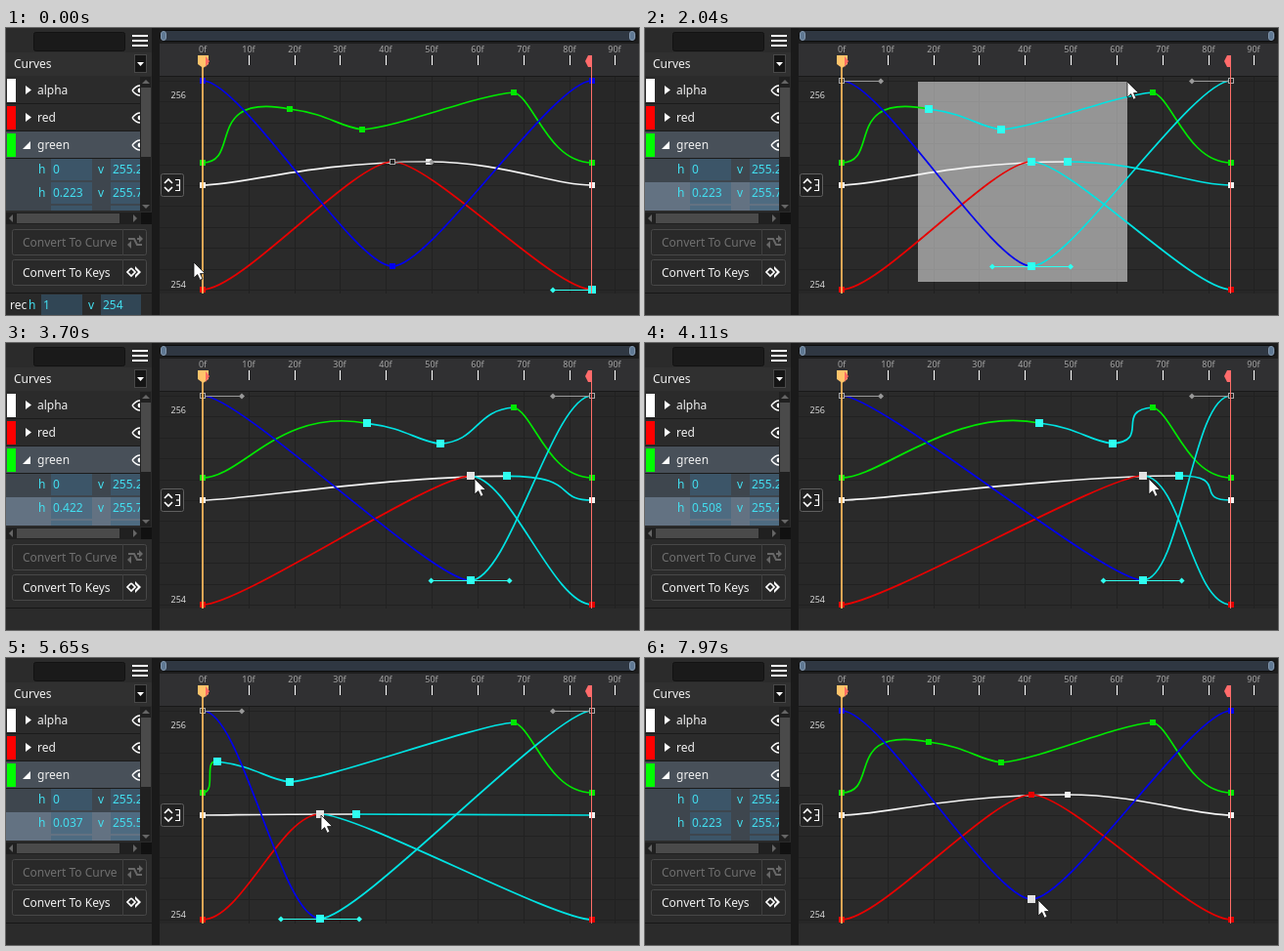
These frames come from a looping animation (647 by 294 pixels, 8 s). An HTML page with a canvas:

```html
<!DOCTYPE html>
<html lang="en">
<head>
<meta charset="utf-8">
<title>Curve editor</title>
<style>
html, body { margin: 0; width: 100%; height: 100%; overflow: hidden; background: #2b2b2b; }
canvas { display: block; }
</style>
</head>
<body>
<canvas id="stage" width="647" height="294"></canvas>
<script>
const ctx = document.getElementById('stage').getContext('2d');
const LOOP = 8000, FRAME = 398 / 85, CYAN = '#2ffff0';
const MARQUEE = { x: 279, y: 260, from: 890, to: 2220 };
const DESELECT_FIRST = 820, DESELECT_ALL = 7230;

// Time, x, y
const cursorPath = [
  [50, 192, 240], [840, 279, 260], [890, 279, 260], [1300, 379, 150],
  [1660, 459, 73], [2040, 493, 55], [2220, 493, 55], [2960, 397, 138],
  [3140, 397, 138], [3930, 513, 139], [4160, 515, 139], [4360, 515, 139],
  [4450, 512, 140], [4680, 512, 140], [5470, 326, 158], [5650, 322, 161],
  [5980, 322, 161], [6540, 397, 142], [6770, 397, 142], [6870, 417, 174],
  [7230, 480, 200], [7560, 480, 200], [7970, 402, 248]
];
const dragPath = [
  [3140, 0, 0], [3930, 112, -1], [4160, 114, -1], [4360, 114, -1],
  [4450, 111, 0], [4680, 111, 0], [5470, -70, 20], [5650, -74, 23],
  [5980, -74, 23], [6540, 0, 3]
];

// Each key: position, incoming handle, outgoing handle
const key = (x, y, inH = [-40, 0], outH = [40, 0]) => ({ x, y, inH, outH });
const curves = [
  { color: '#f4f4f4', keys: [key(201, 161), key(432, 137, [-120, 0], [75, 0]), key(599, 161)] },
  { color: '#00e800', keys: [
    key(201, 138), key(289.8, 83, [-89, -17], [40, 5]), key(364, 104, [-24, -3], [40, -3]),
    key(519, 66, [-40, 3], [20, 5]), key(599, 138, [-45, 0])] },
  { color: '#e80000', keys: [key(201, 268), key(395, 137), key(599, 268)] },
  { color: '#0000f0', keys: [key(201, 54), key(395, 244), key(599, 54)] }
];

function along(path, t) {
  if (t <= path[0][0]) return path[0].slice(1);
  for (let i = 1; i < path.length; i++) {
    const [t1, x1, y1] = path[i], [t0, x0, y0] = path[i - 1];
    if (t < t1) {
      const k = (t - t0) / (t1 - t0);
      return [x0 + (x1 - x0) * k, y0 + (y1 - y0) * k];
    }
  }
  return path[path.length - 1].slice(1);
}

function box(x, y, w, h, fill, stroke) {
  if (fill) { ctx.fillStyle = fill; ctx.fillRect(x, y, w, h); }
  if (stroke) { ctx.strokeStyle = stroke; ctx.lineWidth = 1; ctx.strokeRect(x + .5, y + .5, w - 1, h - 1); }
}
function rounded(x, y, w, h, r, fill, stroke) {
  ctx.beginPath();
  ctx.roundRect(x + .5, y + .5, w - 1, h - 1, r);
  ctx.fillStyle = fill;
  ctx.fill();
  ctx.strokeStyle = stroke;
  ctx.lineWidth = 1;
  ctx.stroke();
}
function poly(points, fill, stroke, width = 1) {
  ctx.beginPath();
  for (let i = 0; i < points.length; i += 2) ctx.lineTo(points[i], points[i + 1]);
  if (fill) { ctx.closePath(); ctx.fillStyle = fill; ctx.fill(); }
  if (stroke) { ctx.strokeStyle = stroke; ctx.lineWidth = width; ctx.stroke(); }
}
function text(s, x, y, color = '#f0f0f0', size = 12, align = 'left') {
  ctx.font = `${size}px "Noto Sans", "Open Sans", sans-serif`;
  ctx.textAlign = align;
  ctx.textBaseline = 'alphabetic';
  ctx.fillStyle = color;
  ctx.fillText(s, x, y);
}
function clipped(x, y, w, h, draw) {
  ctx.save();
  ctx.beginPath();
  ctx.rect(x, y, w, h);
  ctx.clip();
  draw();
  ctx.restore();
}
const square = (x, y, size, color) => box(Math.round(x - size / 2), Math.round(y - size / 2), size, size, color);
const diamond = (x, y, color) => poly([x - 3, y, x, y - 3, x + 3, y, x, y + 3], color);

function field(label, value, x, y, width) {
  text(label, x, y + 4, '#43dff0');
  box(x + 13, y - 11, width, 22, 'rgba(58,100,130,.5)');
  text(value, x + 15, y + 4, '#43dff0');
}

function drawEye(x, y) {
  ctx.beginPath();
  ctx.moveTo(x - 8, y);
  ctx.quadraticCurveTo(x, y - 10, x + 8, y);
  ctx.quadraticCurveTo(x, y + 10, x - 8, y);
  ctx.strokeStyle = '#fff';
  ctx.lineWidth = 1.3;
  ctx.stroke();
  ctx.beginPath();
  ctx.arc(x, y, 2.4, 0, 7);
  ctx.fillStyle = '#fff';
  ctx.fill();
}

function drawRows(greenKeys) {
  clipped(0, 50, 137, 137, () => {
    box(0, 50, 137, 137, '#222');
    ['#fff', '#f00', '#0f0'].forEach((color, i) => {
      const y = 50 + 28 * i;
      box(0, y, 137, 27, i === 2 ? '#485059' : '#2b2b2b');
      box(0, y + 27, 137, 1, '#1b1b1b');
      box(1, y + 2, 9, 24, color);
      poly(i === 2 ? [17, y + 18, 25, y + 18, 25, y + 10] : [20, y + 9, 26, y + 13.5, 20, y + 18], '#fff');
      text(['alpha', 'red', 'green'][i], 32, y + 18);
      drawEye(137, y + 14);
    });
    greenKeys.slice(0, 3).forEach((k, i) => {
      const y = 134 + 24 * i;
      const h = Math.floor((k.x - 201) / .398) / 1000;
      box(0, y, 137, 24, k.selected ? '#637282' : '#3e464e');
      field('h', i ? h.toFixed(3) : '0', 33, y + 11, 42);
      field('v', (254 + (268 - k.y) / 107).toFixed(3), 94, y + 11, 42);
    });
  });
}

function drawButton(y, label, color) {
  rounded(6, y, 138, 27, 2, '#292929', '#484848');
  box(119, y, 1, 27, '#404040');
  text(label, 17, y + 18, color);
}

function drawPanel(t, greenKeys) {
  box(0, 0, 150, 294, '#2b2b2b');
  box(0, 25, 150, 24, '#303030');
  rounded(28, 4, 94, 20, 2, '#1a1a1a', '#121212');
  [8, 13, 18].forEach(y => box(129, y - 1, 16, 2, '#fff'));
  text('Curves', 8, 41);
  box(131, 27, 13, 19, '#151515', '#484848');
  poly([134, 35, 141, 35, 137.5, 39], '#fff');
  drawRows(greenKeys);

  box(137, 50, 11, 138, '#202020');
  box(138, 61, 10, 71, '#4a4a4a');
  poly([139, 57, 147, 57, 143, 53], '#666');
  poly([139, 181, 147, 181, 143, 185], '#666');
  box(0, 189, 138, 12, '#202020');
  box(138, 189, 12, 12, '#111');
  box(11, 190, 105, 10, '#4a4a4a');
  poly([7, 191, 7, 199, 3, 195], '#666');
  poly([130, 191, 130, 199, 134, 195], '#666');

  drawButton(206, 'Convert To Curve', '#707070');
  drawButton(237, 'Convert To Keys', '#f0f0f0');
  poly([125, 216, 131, 216, 134, 222, 139, 222], null, '#686868', 2);
  poly([134, 216, 138, 216], null, '#686868', 2);
  poly([136, 212, 140, 216, 136, 220], '#686868');
  poly([128, 218, 124, 222, 128, 226], '#686868');
  poly([128, 246, 124, 250, 128, 254, 132, 250, 128, 246], null, '#fff', 1.7);
  poly([132, 244, 138, 250, 132, 256, 132, 253, 135, 250, 132, 247], '#fff');

  box(0, 271, 150, 1, '#171717');
  if (t < DESELECT_FIRST) {
    box(0, 272, 150, 22, '#292929');
    text('rec', 4, 288);
    field('h', '1', 23, 284, 42);
    field('v', '254', 84, 284, 41);
  }
  box(149, 0, 8, 294, '#1a1a1a');
}

function drawGrid() {
  box(156, 0, 491, 294, '#2b2b2b');
  box(156, 0, 491, 16, '#1d1d1d');
  rounded(157, 2, 488, 12, 4, '#2f3742', '#0d0d0d');
  [158, 637].forEach(x => rounded(x, 3, 6, 10, 3, '#5f7893', '#8397ad'));
  box(156, 16, 491, 33, '#303032');
  box(156, 49, 491, 223, '#272727');
  box(201, 50, 398, 222, '#2a2a2a');
  for (let i = 0; i < 10; i++) {
    const x = Math.round(201 + i * 10 * FRAME);
    box(x, 50, 1, 222, '#212121');
    box(x, 28, 1, 10, '#fff');
    text(`${i * 10}f`, x, 25, '#a5a5a5', 9, 'center');
  }
  for (let i = 0; i <= 10; i++) box(157, Math.round(268 - i * 21.4), 490, 1, '#212121');
  box(156, 49, 491, 1, '#191919');
  text('256', 184, 72, '#d8d8d8', 9, 'right');
  text('254', 184, 266, '#d8d8d8', 9, 'right');

  rounded(158, 149, 24, 24, 2, '#222', '#606060');
  poly([162, 159, 166, 155, 170, 159], null, '#fff', 1.6);
  poly([162, 163, 166, 167, 170, 163], null, '#fff', 1.6);
  poly([173, 155.5, 177.5, 155.5, 177.5, 166.5, 173, 166.5], null, '#fff', 1.2);
  poly([174, 161, 178, 161], null, '#fff', 1.2);
}

// Handles shrink so that they never leave their segment.
function control(k, handle, span) {
  const scale = Math.min(1, span / Math.max(1, Math.abs(handle[0])));
  return [k.x + handle[0] * scale, k.y + handle[1] * scale];
}

function drawCurve({ color, keys }) {
  ctx.lineWidth = 1.7;
  for (let i = 1; i < keys.length; i++) {
    const a = keys[i - 1], b = keys[i], span = b.x - a.x;
    ctx.beginPath();
    ctx.moveTo(a.x, a.y);
    ctx.bezierCurveTo(...control(a, a.outH, span), ...control(b, b.inH, span), b.x, b.y);
    ctx.strokeStyle = a.selected ? '#00e3e3' : color;
    ctx.stroke();
  }
}

function drawHandle(k, dx, color) {
  const y = Math.round(k.y);
  box(Math.min(k.x, k.x + dx), y, Math.abs(dx), 1, color);
  diamond(k.x + dx, y + .5, color);
}

function drawKeys(curve, cursor, canHover) {
  curve.keys.forEach(k => {
    const near = canHover && Math.hypot(k.x - cursor[0], k.y - cursor[1]) < 9;
    if (near) square(k.x, k.y, 8, '#e2e2e2');
    else if (k.selected) square(k.x, k.y, 8, CYAN);
    else square(k.x, k.y, 6, curve.color);
  });
}

function drawFocus(keys, index) {
  const k = keys[index], before = keys[index - 1], after = keys[index + 1];
  const hollow = (n, dx) => {
    drawHandle(n, dx, '#999');
    box(Math.round(n.x) - 3, Math.round(n.y) - 3, 6, 6, '#222', '#aaa');
  };
  if (before) { hollow(before, 40); drawHandle(k, -40, CYAN); }
  if (after) { hollow(after, -40); drawHandle(k, 40, CYAN); }
}

function drawPointer([x, y]) {
  ctx.save();
  ctx.translate(Math.round(x), Math.round(y));
  poly([0, 0, 0, 16, 3.7, 12.6, 6.3, 18.3, 9, 17, 6.5, 11.6, 11.5, 11.6, 0, 0], '#fff', '#111', .8);
  ctx.restore();
}

function poseCurves(t) {
  const [dx, dy] = along(dragPath, t);
  const [right, top] = along(cursorPath, Math.min(t, MARQUEE.to));
  const active = t >= MARQUEE.from && t < DESELECT_ALL;
  const ever = k => k.x > MARQUEE.x && k.x < 493 && k.y > 55 && k.y < MARQUEE.y;
  return curves.map(({ color, keys }) => ({
    color,
    keys: keys.map(k => ({
      ...k,
      x: k.x + (ever(k) ? dx : 0),
      y: k.y + (ever(k) ? dy : 0),
      selected: active && ever(k) && k.x < right && k.y > top
    }))
  }));
}

function render(t) {
  const cursor = along(cursorPath, t);
  const posed = poseCurves(t);
  const [, green, red, blue] = posed;
  const marquee = t >= MARQUEE.from && t < MARQUEE.to;
  if (t < DESELECT_FIRST) red.keys[2].selected = true;

  ctx.clearRect(0, 0, 647, 294);
  drawGrid();
  drawPanel(t, green.keys);
  if (marquee) {
    const x = Math.round(cursor[0]), y = Math.round(cursor[1]);
    box(MARQUEE.x, y, x - MARQUEE.x, MARQUEE.y - y, 'rgba(255,255,255,.5)');
  }
  clipped(157, 50, 490, 222, () => {
    posed.forEach(drawCurve);
    posed.forEach(c => drawKeys(c, cursor, !marquee));
    if (red.keys[2].selected) {
      drawFocus(red.keys, 2);
      square(599, 268, 8, CYAN);
    }
    if (blue.keys[1].selected) drawFocus(blue.keys, 1);
  });

  box(200, 38, 2, 234, 'rgba(255,190,95,.85)');
  poly([196, 28, 207, 28, 207, 37, 201.5, 41, 196, 37], '#ffc46b');
  poly([204, 29, 208, 34, 204, 40], '#ff6b62');
  box(598, 28, 1, 244, '#ff6f68');
  poly([599, 28, 595, 28, 592, 34, 595, 40, 599, 40], '#ff6b6b');

  if (t >= 6800 && t < 6930) {
    ctx.setLineDash([4, 3]);
    box(409, 140, 14, 14, null, '#f00000');
    ctx.setLineDash([]);
    square(416, 147, 4, '#fff');
  }
  drawPointer(cursor);
}

function tick(now) {
  render(now % LOOP);
  requestAnimationFrame(tick);
}
render(0);
requestAnimationFrame(tick);
</script>
</body>
</html>
```
